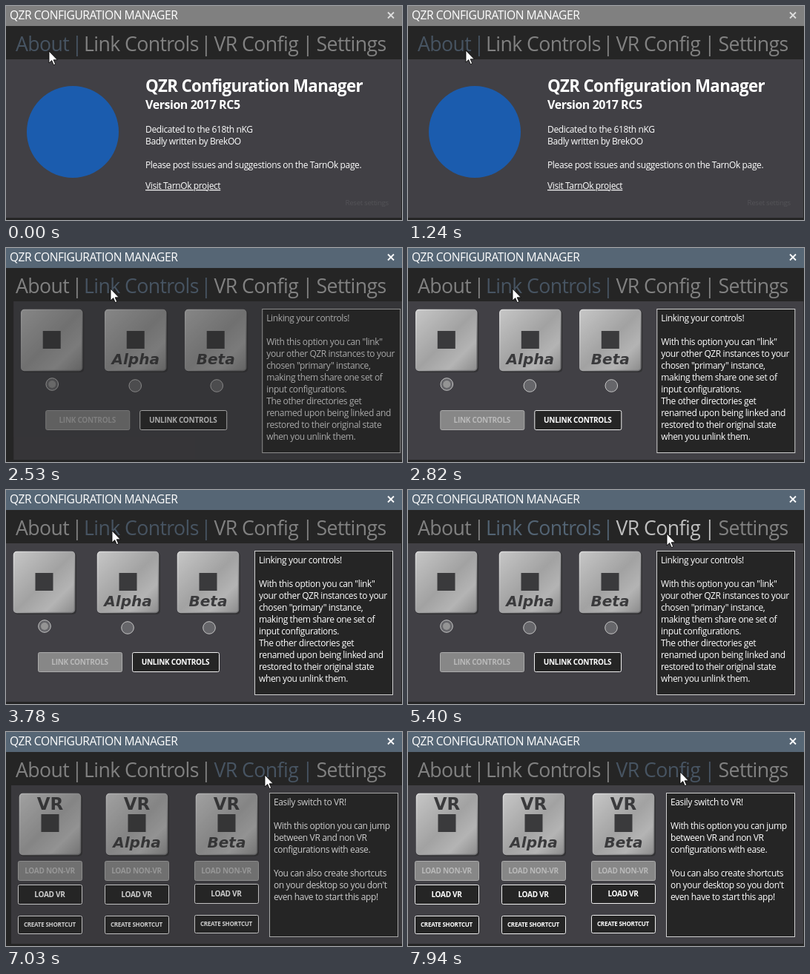
These frames come from a looping animation (534 px wide and 289 px high, 7.99 s). An HTML page:

```html
<!DOCTYPE html>
<html lang="en">
<head>
<meta charset="utf-8">
<title>Configuration Manager</title>
<style>
html, body { margin: 0; width: 100%; height: 100%; overflow: hidden; background: #252525 }
svg { display: block; width: 534px; height: 289px }
text { font: 12px "Open Sans", "Noto Sans", sans-serif; letter-spacing: -.028em; fill: #fff; white-space: pre }
.page text { font-weight: 500; letter-spacing: -.031em }
.tab text { font-size: 26.67px; fill: inherit; letter-spacing: -.022em }
.mid { text-anchor: middle }
.page .bold { font-weight: 700; letter-spacing: -.028em }
.page .tile { font: 700 20px "DejaVu Sans", sans-serif; letter-spacing: 0; fill: #3a3a3c; text-anchor: middle }
.page .slant { font-style: italic }
</style>
</head>
<body>
<svg id="stage" viewBox="0 0 534 289"></svg>
<script>
const LOOP = 7990, SLIDE = 600, FADE = 300;
const stage = document.getElementById('stage');

const text = (x, y, s, size = 12, extra = '') =>
  `<text x="${x}" y="${y}" style="font-size:${size}px" ${extra}>${s}</text>`;
const rect = (x, y, w, h, fill, extra = '') =>
  `<rect x="${x}" y="${y}" width="${w}" height="${h}" fill="${fill}" ${extra}/>`;
const lines = (x, y, list) => list.map((s, i) => text(x, y + 16 * i, s)).join('');

function button(x, y, w, h, label, off, size = 10) {
  return rect(x + .5, y + .5, w - 1, h - 1, off ? '#878787' : '#252525',
      `rx="2" stroke="${off ? '#acacac' : '#f0f0f0'}"`) +
    text(x + w / 2 - .5, y + h / 2 + size * .36, label, size,
      `class="bold mid" ${off ? 'fill-opacity=".42"' : ''}`);
}

function tile(x, label, vr) {
  const mid = x + 41.5;
  return rect(x + 1, 84, 84, 84, '#29292b', 'rx="5" opacity=".6"') +
    rect(x + .5, 83.5, 82, 82, 'url(#metal)', 'rx="4" stroke="url(#rim)" stroke-width="1.5"') +
    (vr ? text(mid, 105, 'VR', 23, 'class="tile"') : '') +
    rect(mid - 12, vr ? 111 : 112, 24, 24, '#3a3a3c') +
    text(mid, vr ? 156 : 157, label, 20, 'class="tile slant"');
}

const radio = (x, y, on) =>
  `<circle cx="${x}" cy="${y}" r="8.3" fill="#66666a" stroke="#c6c6c6"/>` +
  (on ? `<circle cx="${x}" cy="${y}" r="5" fill="#949494"/>` : '');

const infoBox = (x, list) =>
  rect(x + .5, 82.5, 521 - x, 194, '#252525', 'stroke="#d0d0d0"') + lines(x + 6, 99, list);

const about =
  '<circle cx="90" cy="170" r="62" fill="#1b5cae"/>' +
  text(188, 116, 'QZR Configuration Manager', 22.3, 'class="bold"') +
  text(188, 139, 'Version 2017 RC5', 16, 'class="bold"') +
  lines(188, 171, ['Dedicated to the 618th nKG', 'Badly written by BrekOO', '',
    'Please post issues and suggestions on the TarnOk page.']) +
  text(188, 247, 'Visit TarnOk project', 12, 'text-decoration="underline"') +
  text(457.5, 269, 'Reset settings', 9.7, 'fill-opacity=".1"');

const link =
  tile(10, '') + tile(123, 'Alpha') + tile(231, 'Beta') +
  radio(52, 184, true) + radio(164, 186) + radio(274, 186) +
  button(43, 219, 114, 27, 'LINK CONTROLS', true) +
  button(170, 219, 118, 27, 'UNLINK CONTROLS') +
  infoBox(335, ['Linking your controls!', '', 'With this option you can "link"',
    'your other QZR instances to your', 'chosen "primary" instance,',
    'making them share one set of', 'input configurations.',
    'The other directories get', 'renamed upon being linked and',
    'restored to their original state', 'when you unlink them.']);

const vrColumn = (x, label, dy) =>
  tile(x + 2, label, true) +
  button(x, 174, 87, 27, 'LOAD NON-VR', true) +
  button(x, 206 + dy, 87, 27, 'LOAD VR') +
  button(x, 248 + dy, 87, 25, 'CREATE SHORTCUT', false, 8);

const vr =
  vrColumn(9, '', 0) + vrColumn(126, 'Alpha', 0) + vrColumn(247, 'Beta', -1) +
  infoBox(348, ['Easily switch to VR!', '', 'With this option you can jump',
    'between VR and non VR', 'configurations with ease.', '',
    'You can also create shortcuts', "on your desktop so you don't",
    'even have to start this app!']);

// label, text x, separator x, right edge of the hover area
const tabs = [
  ['About', 13, 95.5, 103], ['Link Controls', 105, 269.5, 277],
  ['VR Config', 280.5, 406.5, 414], ['Settings', 418.5, 0, 520]
];
const pageStart = [-1000, 2350, 6800];

stage.innerHTML =
  `<defs><linearGradient id="metal" x2="1" y2="1">
    <stop stop-color="#c6c6c6"/><stop offset=".5" stop-color="#a2a2a2"/>
    <stop offset=".75" stop-color="#b4b4b4"/><stop offset="1" stop-color="#8c8c8c"/>
  </linearGradient><linearGradient id="rim" x2="1" y2="1">
    <stop stop-color="#dcdcdc"/><stop offset="1" stop-color="#707072"/>
  </linearGradient></defs>` +
  rect(0, 0, 534, 289, '#252525') +
  rect(0, 0, 534, 27, '#808080', 'id="bar"') +
  text(5, 18, 'QZR CONFIGURATION MANAGER', 15.6) +
  '<path id="close" d="M515 8.5l8 8m0-8l-8 8" stroke-width="1.8"/>' +
  tabs.map(([s, x, sep]) => `<g class="tab"><text x="${x}" y="61">${s}</text>` +
    (sep ? `<text class="mid" x="${sep}" y="61">|</text>` : '') + '</g>').join('') +
  [about, link, vr].map(p => `<g class="page">${rect(0, 72, 533, 214, '#414045')}${p}</g>`).join('') +
  `<path id="cursor" d="M0 0V16L3.7 12.6 6.3 18.6 8.7 17.6 6.1 11.8H11.3Z"
    fill="#fff" stroke="#000" stroke-width=".8"/>`;

const [bar, close, cursor] = ['bar', 'close', 'cursor'].map(id => document.getElementById(id));
const tabNodes = stage.querySelectorAll('.tab'), pages = stage.querySelectorAll('.page');

// time, x, y, ease-out power
const path = [
  [0, 58, 61, 1], [1110, 58, 61, 1], [1930, 135, 57, 1.7], [2070, 141, 55, 1],
  [3770, 141, 55, 1], [4570, 288, 61, 1.15], [5400, 349, 59, 1.6],
  [7770, 349, 58, 1], [7940, 367, 54, 1], [LOOP, 367, 54, 1]
];

function cursorAt(t) {
  const i = path.findIndex(k => k[0] > t);
  const [t0, x0, y0] = path[i - 1], [t1, x1, y1, power] = path[i];
  const e = 1 - (1 - (t - t0) / (t1 - t0)) ** power;
  return [Math.round(x0 + (x1 - x0) * e), Math.round(y0 + (y1 - y0) * e)];
}

function draw(now) {
  const t = now % LOOP;
  const page = pageStart.filter(s => t >= s).length - 1;
  const [x, y] = cursorAt(t);
  const hover = tabs.findIndex(tab => x < tab[3]);
  const active = t >= pageStart[1];

  bar.setAttribute('fill', active ? '#566675' : '#808080');
  close.setAttribute('stroke', active ? '#fff' : '#ddd');
  tabNodes.forEach((g, i) => {
    g.style.fill = i === page ? (i === hover ? '#475462' : '#536474')
      : i === hover ? '#bebebe' : '#818181';
  });

  const age = t - pageStart[page];
  const shift = 30 * (1 - Math.min(1, age / SLIDE)) ** 3;
  pages.forEach((g, i) => {
    g.style.display = i === page ? '' : 'none';
    g.setAttribute('transform', `translate(${shift.toFixed(2)} 0)`);
    g.setAttribute('opacity', Math.min(1, age / FADE));
  });
  cursor.setAttribute('transform', `translate(${x} ${y})`);
  requestAnimationFrame(draw);
}
requestAnimationFrame(draw);
</script>
</body>
</html>
```
